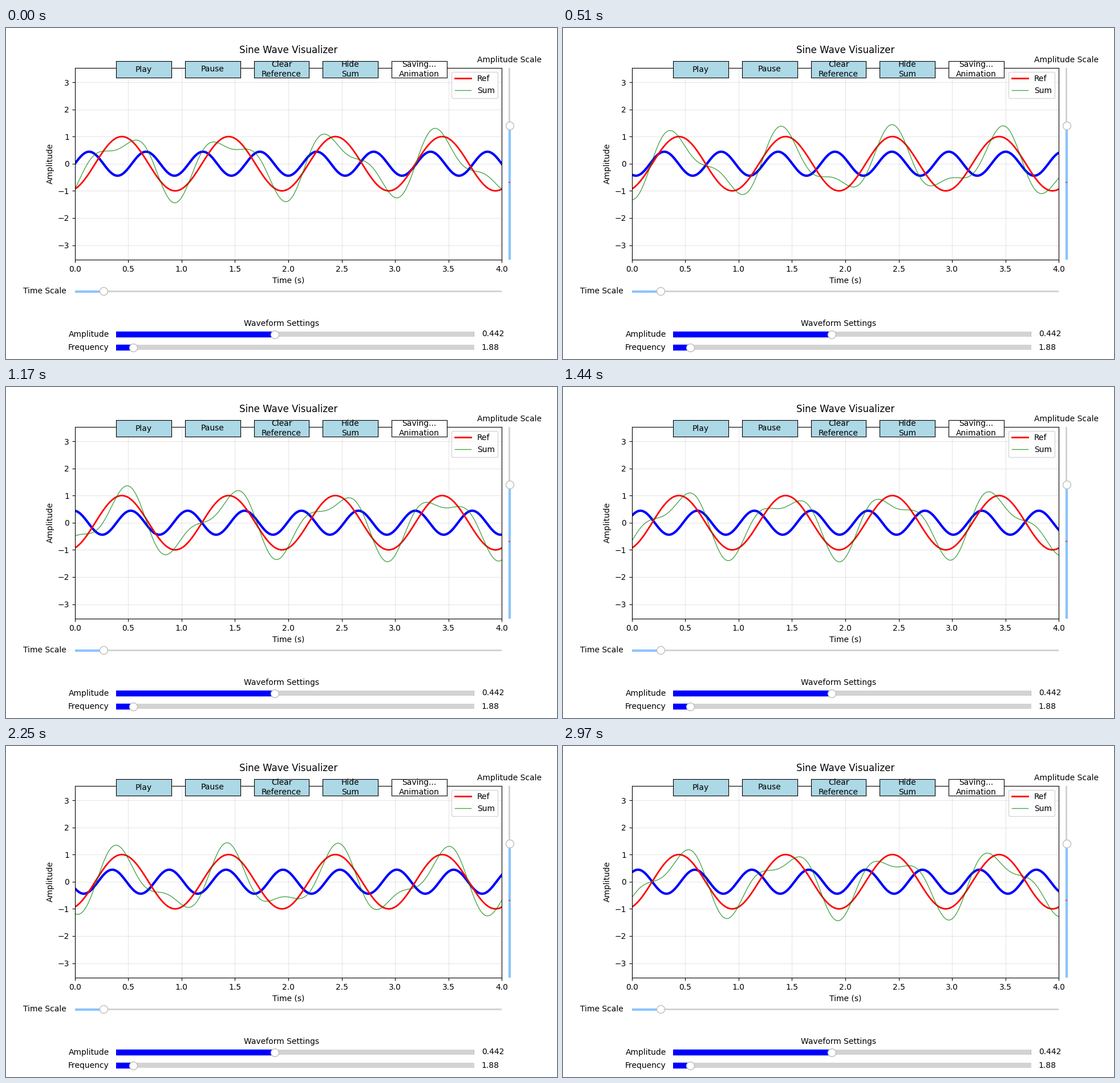
These frames come from a looping animation (966x580 px, 3 s). A matplotlib script:

```python
import numpy as np
import matplotlib.pyplot as plt
from matplotlib.animation import FuncAnimation
from matplotlib.widgets import Button, Slider

FRAMES, INTERVAL = 100, 30
AMP, FREQ = 0.442, 1.876
STEP = 0.01          # seconds of signal per frame
REF_SHIFT = 0.19
PALE_BLUE = "#8cc4fb"

plt.rcParams["font.family"] = "DejaVu Sans"
fig = plt.figure(figsize=(9.66, 5.80), dpi=100)


def wave(t, amp, freq, shift):
    return amp * np.sin(2 * np.pi * freq * (t - shift))


def add_slider(rect, label, init, value, vmax=1.0, color="blue",
               orientation="horizontal", show_value=True):
    slider = Slider(fig.add_axes(rect), label, 0, vmax, valinit=init,
                    valfmt="%.3g", color=color, orientation=orientation)
    slider.set_val(value)
    slider.valtext.set_visible(show_value)
    return slider


def add_button(left, label, color="lightblue"):
    return Button(fig.add_axes([left, 0.85, 0.1, 0.05]), label, color=color)


# Main plot
ax = fig.add_axes([0.125, 0.3, 0.775, 0.58])
t = np.linspace(0, 4, 1000)
ref = wave(t, 1, 1, REF_SHIFT)
live_line, = ax.plot(t, wave(t, AMP, FREQ, 0), color="blue", lw=3)
ax.plot(t, ref, color="red", lw=2, label="Ref")
sum_line, = ax.plot(t, ref, color="green", lw=1, alpha=0.7, label="Sum")
ax.set_xlim(0, 4)
ax.set_ylim(-8 * AMP, 8 * AMP)
ax.set_xlabel("Time (s)")
ax.set_ylabel("Amplitude")
ax.set_title("Sine Wave Visualizer", y=1.05)
ax.grid(True, alpha=0.3)
ax.legend(loc="upper right")

# Controls
sliders = [
    add_slider([0.125, 0.2, 0.775, 0.01], "Time Scale", 0.067, 0.067,
               color=PALE_BLUE, show_value=False),
    add_slider([0.9106, 0.3, 0.0062, 0.58], "Amplitude Scale", 0.404, 0.6985,
               color=PALE_BLUE, orientation="vertical", show_value=False),
    add_slider([0.2, 0.06, 0.65, 0.03], "Amplitude", 1, AMP),
    add_slider([0.2, 0.02, 0.65, 0.03], "Frequency", FREQ, FREQ, vmax=40),
]
fig.text(0.5, 0.1, "Waveform Settings", ha="center")

labels = ["Play", "Pause", "Clear\nReference", "Hide\nSum"]
buttons = [add_button(0.2 + 0.125 * i, s) for i, s in enumerate(labels)]
buttons.append(add_button(0.7, "Saving...\nAnimation", "white"))


def update(frame):
    live = wave(t, AMP, FREQ, STEP * frame)
    live_line.set_ydata(live)
    sum_line.set_ydata(live + ref)
    return live_line, sum_line


anim = FuncAnimation(fig, update, frames=FRAMES, interval=INTERVAL,
                     repeat=True, repeat_delay=0, blit=False)
plt.show()
```
